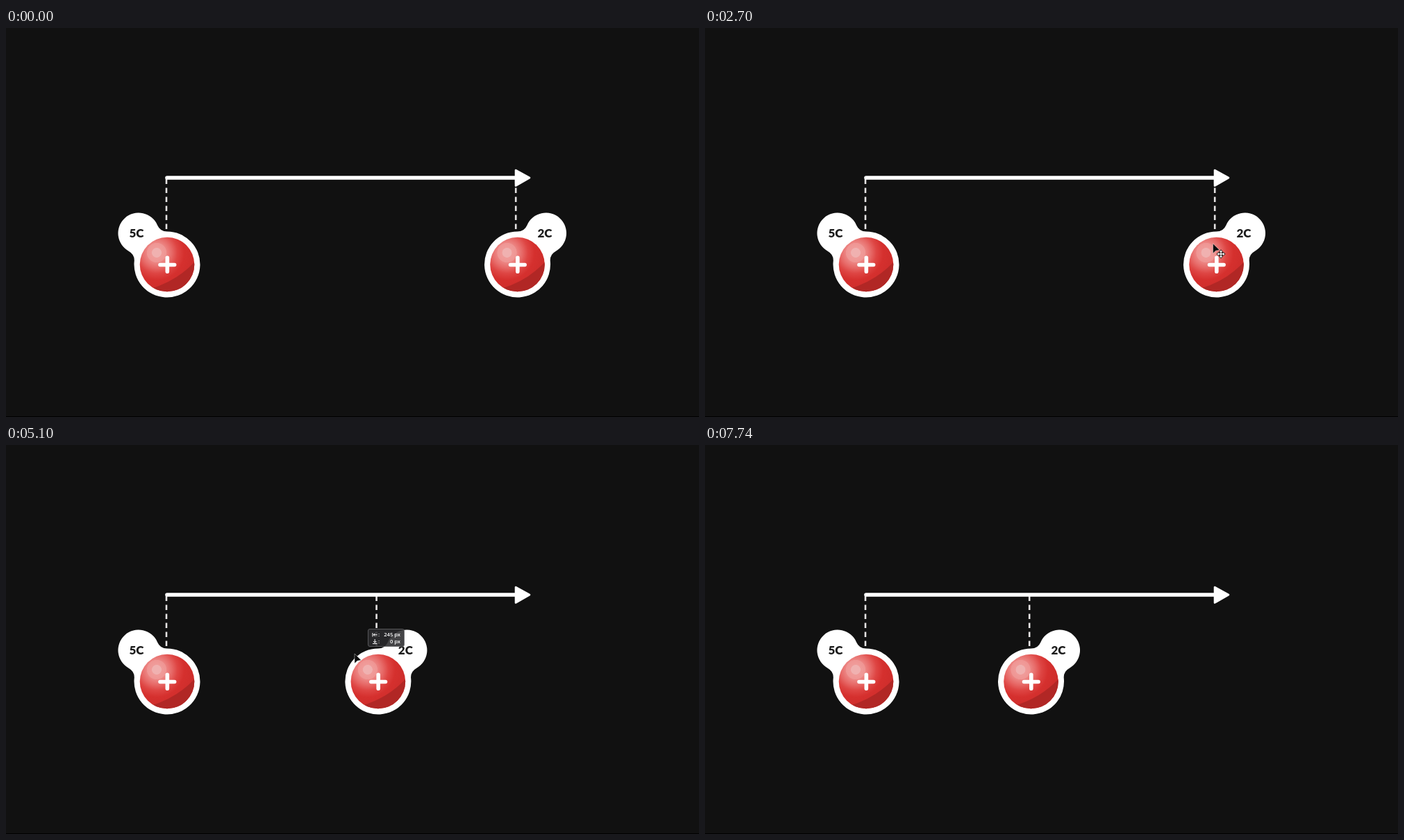
An HTML page that plays this animation: 998x561 px, repeating every 8000 ms.

```html
<!DOCTYPE html>
<html lang="en">
<head>
<meta charset="utf-8">
<title>Two charges</title>
<style>
  html, body { margin: 0; width: 100%; height: 100%; overflow: hidden; background: #111; }
  svg { display: block; width: 100vw; height: 100vh; }
  .label { font: 900 17px Lato, sans-serif; fill: #1c1c1c; text-anchor: middle; }
  .readout text { font: 600 7.6px "Open Sans", sans-serif; fill: #fff; }
  .readout .value { text-anchor: end; }
  .dash { stroke: #e4e2e2; stroke-width: 2.6; stroke-dasharray: 7.5 5.5; }
  .icon { fill: none; stroke: #fff; stroke-width: 1; }
</style>
</head>
<body>
<svg viewBox="0 0 998 561">
  <defs>
    <radialGradient id="shine" gradientUnits="userSpaceOnUse" cx="-15" cy="-17" r="60">
      <stop offset="0" stop-color="#f0b1b0"/>
      <stop offset=".11" stop-color="#f0b1b0"/>
      <stop offset=".12" stop-color="#f09c9a"/>
      <stop offset=".23" stop-color="#ef9593"/>
      <stop offset=".24" stop-color="#ec8583"/>
      <stop offset=".36" stop-color="#e76a68"/>
      <stop offset=".5" stop-color="#de4543"/>
      <stop offset=".66" stop-color="#d5302e"/>
      <stop offset="1" stop-color="#cb2c2a"/>
    </radialGradient>
    <clipPath id="ballClip"><circle r="39.3"/></clipPath>
    <path id="blob" fill="#fff" d="M0-47.5A15.1 15.1 0 0 0 13.9-56.6A29.5 29.5 0 1 1 55.1-19.1A15.1 15.1 0 0 0 47.3-4.4A47.5 47.5 0 1 1 0-47.5Z"/>
    <g id="ball">
      <circle r="39.3" fill="url(#shine)"/>
      <path clip-path="url(#ballClip)" fill="#b12725" d="M-24 35Q14 24 40-4V40H-24Z"/>
      <path d="M-10 .5H10.6M.3-9.8V10.2" stroke="#fff" stroke-width="5.6" stroke-linecap="round"/>
    </g>
  </defs>

  <rect width="998" height="561" fill="#111"/>
  <rect y="560" width="998" height="1" fill="#000"/>

  <path class="dash" d="M231 217.5V291"/>
  <path class="dash" id="marker" d="M-2.3 217.5V291"/>
  <path d="M232 216H735" stroke="#fff" stroke-width="5.6" stroke-linecap="round"/>
  <path d="M734 205L754 216L734 227.5Z" fill="#fff" stroke="#fff" stroke-width="2.6" stroke-linejoin="round"/>

  <g transform="translate(232 341)">
    <use href="#blob" transform="scale(-1 1)"/>
    <use href="#ball"/>
    <text class="label" x="-44" y="-39">5C</text>
  </g>
  <g id="charge">
    <use href="#blob"/>
    <use href="#ball"/>
    <text class="label" x="39.5" y="-39">2C</text>
  </g>

  <g class="readout" id="readout">
    <rect id="panel" x=".5" y=".5" height="25" rx="2.5" fill="#2b2b2d" fill-opacity=".88" stroke="#68686a" stroke-width=".8"/>
    <path class="icon" d="M7 6V11.5M8 8.7H13.5M10.5 6.7L8.3 8.7L10.5 10.7"/>
    <path class="icon" d="M7 21.5H13.5M10.2 15V20M8.2 18L10.2 20.2L12.2 18"/>
    <text x="15" y="11.2">:</text>
    <text x="15" y="21.2">:</text>
    <text class="value" id="across" y="11.2"></text>
    <text class="value" id="down" y="21.2">0 px</text>
  </g>

  <g id="cursor">
    <path id="pointer" stroke-width=".8" stroke-linejoin="round"/>
    <g id="moveIcon" transform="translate(11.5 15)" stroke-linejoin="round">
      <path id="cross" d="M0-5.5L2-3H.6V-.6H3V-2L5.5 0L3 2V.6H.6V3H2L0 5.5L-2 3H-.6V.6H-3V2L-5.5 0L-3-2V-.6H-.6V-3H-2Z" fill="#fff" stroke="#222" stroke-width="1.6" paint-order="stroke"/>
    </g>
  </g>
</svg>
<script>
const LOOP = 8000;
const START_X = 736.5;
const PX_PER_UNIT = 0.818;
const DRAG = [2880, 6240];
const BIG_ARROW = 'M0 0V14L4 10.3L9.5 9.3Z';
const SMALL_ARROW = 'M0 0V11.8L3.2 8.9L7.8 8Z';

// Rows: time, then values
const chargeKeys = [
  [2880, 736.5], [3450, 694], [3690, 681.5], [4230, 617], [4500, 600],
  [5100, 536], [5310, 508], [5730, 484], [6120, 470.5], [6240, 469.5]
];
const cursorKeys = [
  [60, 926, 486], [810, 926, 310], [1080, 974, 238], [1590, 713, 311],
  [1650, 712, 311], [1980, 699, 310], [2490, 699, 310], [2730, 736, 311],
  [2880, 736, 311], [3450, 679, 310], [3690, 661, 309], [4230, 600, 307],
  [4500, 583, 305], [5100, 502, 301], [5310, 497, 301], [5730, 475, 301],
  [6120, 469, 301], [6240, 469, 301], [6480, 1000, 320]
];
const readoutKeys = [
  [2880, 752, 274], [3450, 694, 272], [4230, 630, 270],
  [5100, 521, 265], [5730, 494, 263], [6240, 484, 263]
];

const el = id => document.getElementById(id);
const place = (id, x, y) => el(id).setAttribute('transform', `translate(${x} ${y})`);
const show = (id, visible) => el(id).style.display = visible ? '' : 'none';
const within = (t, from, to) => t >= from && t < to;

function sample(keys, t) {
  const next = keys.findIndex(key => key[0] > t);
  if (next === 0) return keys[0].slice(1);
  if (next < 0) return keys[keys.length - 1].slice(1);
  const a = keys[next - 1], b = keys[next];
  const k = (t - a[0]) / (b[0] - a[0]);
  return a.slice(1).map((v, i) => v + (b[i + 1] - v) * k);
}

function drawReadout(t, chargeX) {
  const units = Math.round((START_X - chargeX) / PX_PER_UNIT);
  const width = units > 99 ? 53 : 48;
  place('readout', ...sample(readoutKeys, t));
  el('panel').setAttribute('width', width - 1);
  el('across').textContent = units + ' px';
  for (const id of ['across', 'down']) el(id).setAttribute('x', width - 6);
}

function drawCursor(t, dragging) {
  const white = dragging && !within(t, 4920, 5340);
  const pointer = el('pointer');
  place('cursor', ...sample(cursorKeys, t));
  pointer.setAttribute('d', white ? SMALL_ARROW : BIG_ARROW);
  pointer.setAttribute('fill', white ? '#fff' : '#0c0c0c');
  pointer.setAttribute('stroke', white ? '#333' : 'rgba(255,255,255,.5)');
  show('moveIcon', within(t, 1530, DRAG[0]));
}

function frame(now) {
  const t = now % LOOP;
  const dragging = within(t, ...DRAG);
  const [x] = sample(chargeKeys, t);
  place('charge', x, 341);
  place('marker', x, 0);
  show('readout', dragging);
  show('cursor', within(t, 60, 6480));
  drawReadout(t, x);
  drawCursor(t, dragging);
}

const began = performance.now();
function tick() {
  frame(performance.now() - began);
  requestAnimationFrame(tick);
}
tick();
</script>
</body>
</html>
```
